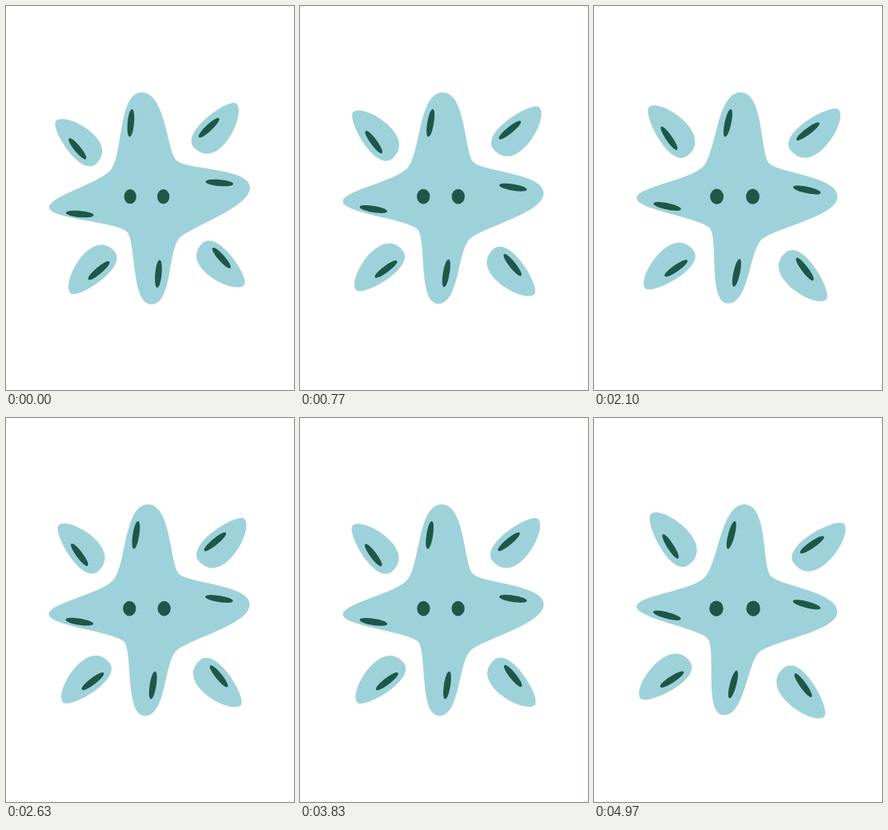
An HTML page with a canvas that plays this animation: 360 px wide and 480 px high, repeating every 5000 ms.

```html
<!DOCTYPE html>
<html lang="en">
<head>
<meta charset="utf-8">
<title>Starfish</title>
<style>
  html, body { margin: 0; width: 100%; height: 100%; overflow: hidden; background: #fff; }
  canvas { display: block; width: 360px; height: 480px; }
</style>
</head>
<body>
<canvas id="stage" width="360" height="480"></canvas>
<script>
const LOOP = 5000;
const FPS = 30;
const SWING = 13.87;   // frames from one pose to the other
const REACH = 0.875;   // part of the swing at which the second pose is reached
const LIGHT = '#9ed2da';
const DARK = '#1c5748';

// Clockwise from the top; points are given in both poses.
// "pull" is the length of the curve handles, "inset" shifts the arm's streak sideways.
const arms = [
  { at: [169.5, 108, 191.5, 108], pull: 30, inset: 12 },
  { at: [305, 227, 304, 245], pull: 25, inset: 4.5 },
  { at: [182, 373, 159, 371], pull: 26, inset: 7 },
  { at: [54, 252, 53, 233], pull: 14, inset: 6.5 }
];
const notches = [
  { at: [213, 193, 223, 199], pull: 17 },
  { at: [217, 290, 204, 294], pull: 21 },
  { at: [151, 282, 140, 274], pull: 17 },
  { at: [130, 206, 140, 198], pull: 24 }
];
const outline = arms.flatMap((arm, i) => [arm, notches[i]]);

const petals = [
  { tip: [62.5, 143.5, 73, 115.5], end: [113, 197, 119.5, 181] },
  { tip: [288, 122, 317, 134.5], end: [236, 178, 253, 183] },
  { tip: [297.5, 349, 286, 378], end: [245, 297, 236, 315] },
  { tip: [80.5, 359, 54, 349], end: [135, 306, 117, 304] }
];

const ctx = document.getElementById('stage').getContext('2d');
const mix = (a, b, k) => a + (b - a) * k;
const pose = ([x0, y0, x1, y1], k) => [mix(x0, x1, k), mix(y0, y1, k)];

function fill(color, trace) {
  ctx.fillStyle = color;
  ctx.beginPath();
  trace();
  ctx.fill();
}

// Maps "along" and "aside" (left of travel) to a point, starting at (x, y).
const frameAt = ([x, y], dx, dy) => (along, aside) =>
  [x + dx * along + dy * aside, y + dy * along - dx * aside];

// The outline turns an eighth of a circle at every tip and notch.
function body(k) {
  const nodes = outline.map(({ at, pull }, i) => {
    const [x, y] = pose(at, k);
    const turn = i * Math.PI / 4;
    const hx = pull * Math.cos(turn), hy = pull * Math.sin(turn);
    return { p: [x, y], before: [x - hx, y - hy], after: [x + hx, y + hy] };
  });
  fill(LIGHT, () => {
    ctx.moveTo(...nodes[0].p);
    nodes.forEach((node, i) => {
      const next = nodes[(i + 1) % nodes.length];
      ctx.bezierCurveTo(...node.after, ...next.before, ...next.p);
    });
  });
}

function streak([ax, ay], [bx, by]) {
  const length = Math.hypot(bx - ax, by - ay);
  const at = frameAt([ax, ay], (bx - ax) / length, (by - ay) / length);
  const half = 5.4;
  fill(DARK, () => {
    ctx.moveTo(ax, ay);
    ctx.bezierCurveTo(...at(0, half), ...at(length, half), bx, by);
    ctx.bezierCurveTo(...at(length, -half), ...at(0, -half), ax, ay);
  });
}

// A drop that bulges more on its left side, with a streak near its middle.
function petal({ tip, end }, k) {
  const a = pose(tip, k), b = pose(end, k);
  const at = frameAt(a, b[0] - a[0], b[1] - a[1]);
  fill(LIGHT, () => {
    ctx.moveTo(...a);
    ctx.bezierCurveTo(...at(0, 0.237), ...at(1, 0.553), ...b);
    ctx.bezierCurveTo(...at(1, -0.37), ...at(0, -0.158), ...a);
  });
  streak(at(0.37, -0.045), at(0.82, -0.075));
}

function armStreak({ at, inset }, i, k) {
  const inward = (i + 1) * Math.PI / 2;
  const place = frameAt(pose(at, k), Math.cos(inward), Math.sin(inward));
  streak(place(21, -inset), place(55.5, -inset - mix(3, 10, k)));
}

function eyes(k) {
  for (const side of [-1, 1]) {
    const x = 176 + side * mix(20.7, 23.5, k);
    fill(DARK, () =>
      ctx.ellipse(x, 238.2, mix(7.6, 8.9, k), mix(9.1, 9.9, k), 0, 0, Math.PI * 2));
  }
}

function draw(now) {
  const frame = Math.floor(((now % LOOP) + 5) * FPS / 1000);
  const phase = (frame / SWING) % 2;
  const k = (1 - Math.abs(1 - phase)) / REACH;

  ctx.clearRect(0, 0, 360, 480);
  body(k);
  petals.forEach(p => petal(p, k));
  arms.forEach((arm, i) => armStreak(arm, i, k));
  eyes(k);
}

const start = performance.now();
function tick() {
  draw(performance.now() - start);
  requestAnimationFrame(tick);
}
tick();
</script>
</body>
</html>
```
